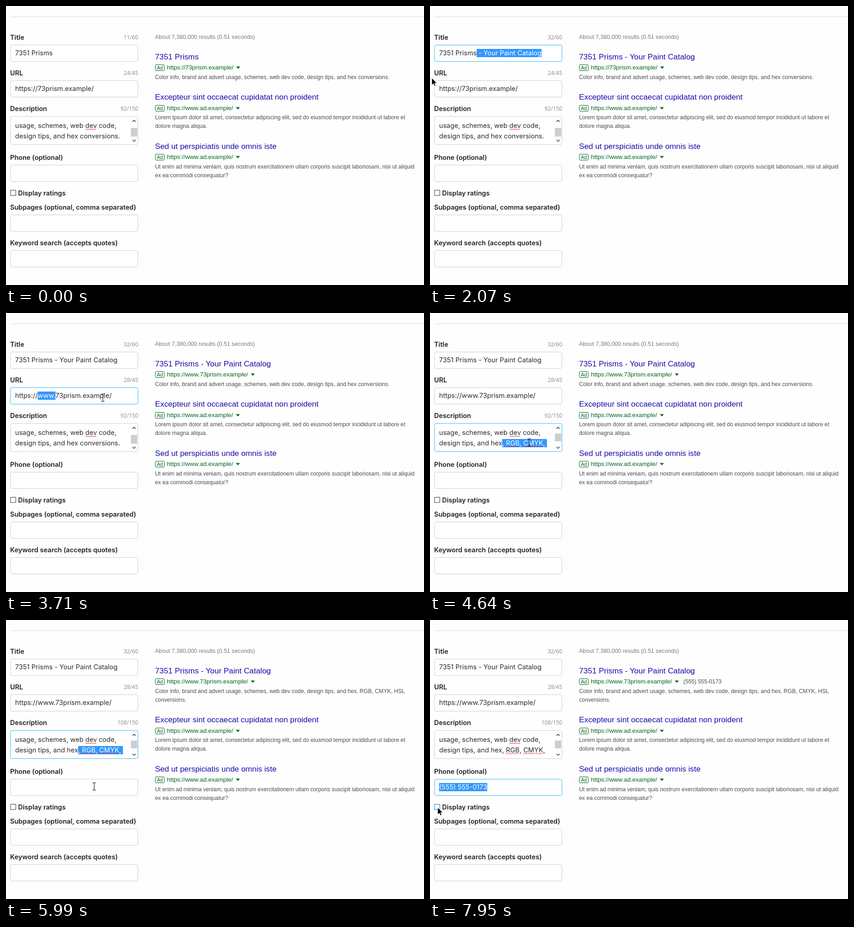
Recreate the animation shown at these times as an HTML page. Size 917 px wide and 611 px high, loop 8000 ms.

```html
<!DOCTYPE html>
<html lang="en">
<head>
<meta charset="utf-8">
<title>Ad preview</title>
<style>
html, body { margin: 0; width: 100%; height: 100%; overflow: hidden; background: #fefefe; }
svg { display: block; width: 917px; height: 611px; }
text { white-space: pre; }
.label { font: 600 14.55px Inter, sans-serif; fill: #222; }
.field { font: 400 14.6px Inter, sans-serif; fill: #2b2b2b; }
.count { font: 400 12px "Open Sans", sans-serif; fill: #888; text-anchor: end; }
.stats { font: 12.55px "Liberation Sans", Arial, sans-serif; fill: #7a7a7a; }
.link { font: 17.25px "Liberation Sans", Arial, sans-serif; fill: #1a0dab; }
.url { font: 13.4px "Liberation Sans", Arial, sans-serif; fill: #006621; }
.badge { font: 11px "Liberation Sans", Arial, sans-serif; fill: #006621; }
.body { font: 12.24px "Liberation Sans", Arial, sans-serif; fill: #4c4c4c; }
</style>
</head>
<body>
<svg id="stage" viewBox="0 0 917 611"></svg>
<script>
const LOOP = 8000;
const stage = document.getElementById('stage');
const ruler = document.createElement('canvas').getContext('2d');
const FIELD_FONT = '400 14.6px Inter, sans-serif';
const URL_FONT = '13.4px "Liberation Sans", Arial, sans-serif';

const NAME = '7351 Prisms', TAGLINE = ' - Your Paint Catalog';
const HOST = '73prism.example/', PHONE = '(555) 555-0173';
const OTHER_URL = 'https://www.ad.example/';

const width = (s, font = FIELD_FONT) => { ruler.font = font; return ruler.measureText(s).width; };
const text = (cls, x, y, s) => `<text class="${cls}" x="${x}" y="${y}">${s}</text>`;
const path = (d, attrs) => `<path d="${d}" ${attrs}/>`;
const rect = (x, y, w, h, attrs) => `<rect x="${x}" y="${y}" width="${w}" height="${h}" ${attrs}/>`;

const box = (y, h, focused) =>
  rect(10, y + .5, 279.5, h, `rx="3.5" fill="#fff" stroke="${focused ? '#2fb9ee' : '#ccc'}"`);

// Field text with an optional selected part or a caret after `before`
function fieldText(y, before, selected, after, caret) {
  const x = 20 + width(before);
  let out = text('field', 20, y, before);
  if (selected) {
    const w = width(selected);
    out += rect(x, y - 14, w, 18, 'fill="#3297fd"') +
      `<text class="field" x="${x}" y="${y}" style="fill:#fff">${selected}</text>` +
      text('field', x + w, y, after);
  } else {
    out += text('field', x, y, after);
  }
  if (caret) out += rect(Math.round(x), y - 14, 1, 18, 'fill="#222"');
  return out;
}

function squiggle(prefix, word, y) {
  const x = 20 + width(prefix);
  let d = `M${x} ${y}`;
  for (let i = 2, up = true; i <= width(word); i += 2, up = !up) d += `L${x + i} ${y + (up ? -2 : 0)}`;
  return path(d, 'fill="none" stroke="#e22" stroke-width="1"');
}

// A half-pixel `y` rounds up for the address row only
function ad(y, title, url, lines, phone) {
  const top = Math.floor(y), row = Math.round(y) + 22;
  const end = 353 + width(url, URL_FONT) + 6;
  return text('link', 327, top, title) +
    rect(327.5, row - 10.5, 20, 13, 'rx="2.5" fill="none" stroke="#006621"') +
    text('badge', 331, row, 'Ad') +
    text('url', 353, row, url) +
    path(`M${end} ${row - 6.5}h9l-4.5 5z`, 'fill="#006621"') +
    (phone ? text('body', end + 19, row, phone) : '') +
    lines.map((s, i) => text('body', 327, top + 43 + i * 19, s)).join('');
}

// Each run: points of time, x, y; the pointer is visible until `until`
const runs = [
  { until: 870, points: [[210, 7, 131], [480, 120, 104], [600, 120, 104], [870, 5, 131]] },
  { until: LOOP, points: [[2070, 4, 158], [2570, 212, 185], [3710, 212, 185], [3970, 217, 283],
    [5570, 217, 283], [5980, 193, 364], [7050, 193, 364], [7370, 38, 410], [7830, 20, 411], [7950, 17, 411]] }
];

function pointerAt(t) {
  const run = runs.find(r => t >= r.points[0][0] && t < r.until);
  if (!run) return null;
  const p = run.points;
  const i = p.findIndex(q => q[0] > t);
  if (i < 0) return p[p.length - 1].slice(1);
  const [t0, x0, y0] = p[i - 1], [t1, x1, y1] = p[i];
  const u = (t - t0) / (t1 - t0), e = u * u * (3 - 2 * u);
  return [x0 + (x1 - x0) * e, y0 + (y1 - y0) * e];
}

const inField = ([x, y]) => x > 10 && x < 272 &&
  [[85, 121], [163, 199], [242, 303], [348, 384]].some(([a, b]) => y > a && y < b);
const onCheckbox = ([x, y]) => x > 8 && x < 131 && y > 399 && y < 421;

function pointer(p) {
  const [x, y] = p.map(Math.round);
  return `<g transform="translate(${x} ${y})">` + (inField(p)
    ? path('M-3 -7.5h2.5l1 1 1-1h2.5M.5 -6.5v14M-3 8.5h2.5l1-1 1 1h2.5', 'fill="none" stroke="#111" stroke-width="1.1"')
    : path('M0 0V15L3.5 11.8 5.9 17.1 8.4 16 6 10.8H10.8Z', 'fill="#000" stroke="#fff" stroke-width=".6"')) + '</g>';
}

function draw(t) {
  const on = (a, b = LOOP) => t >= a && t < b;
  const focus = { title: on(510, 2520), url: on(2520, 4120), desc: on(4120, 6040), phone: on(6040) };
  const fullTitle = on(1330), www = on(3190), longDesc = on(4640), shown = on(4790), phone = on(6380);
  const p = pointerAt(t);
  const label = (y, s, x = 9) => text('label', x, y, s);
  const count = (y, s) => text('count', 290, y, s);

  let out = rect(9, 23, 908, 1, 'fill="#ddd"');

  out += label(74, 'Title') + count(73, on(1540) ? '32/60' : '11/60') + box(85, 36, focus.title) +
    fieldText(108, NAME, fullTitle && focus.title ? TAGLINE : '', fullTitle && !focus.title ? TAGLINE : '', on(510, 1040));

  out += label(152, 'URL') + count(151, www ? '28/45' : '24/45') + box(163, 36, focus.url) +
    fieldText(186, 'https://', www && focus.url ? 'www.' : '', (www && !focus.url ? 'www.' : '') + HOST, on(2540, 3070));

  const line = 'design tips, and hex', extra = ', RGB, CMYK, ';
  out += label(230, 'Description') + count(229, shown ? '108/150' : '92/150') + box(241.5, 61.5, focus.desc) +
    text('field', 20, 267, 'usage, schemes, web dev code,') + squiggle('usage, schemes, web ', 'dev', 271) +
    fieldText(290, line, longDesc && focus.desc ? extra : '',
      !longDesc ? ' conversions.' : focus.desc ? '' : extra, on(4120, 4640));
  if (longDesc) out += squiggle(line + ', ', 'RGB', 293.5) + squiggle(line + ', RGB, ', 'CMYK', 293.5);
  out += rect(274, longDesc ? 264 : 267, 14, longDesc ? 17 : 19, 'fill="#cdcdcd"') +
    path('M277.5 253.5l3.5-3.5 3.5 3.5M277.5 293l3.5 3.5 3.5-3.5', 'fill="none" stroke="#444" stroke-width="1.5"');

  out += label(337, 'Phone (optional)') + box(348, 36, focus.phone) +
    fieldText(371, '', phone ? PHONE : '', '', on(6040, 6380));

  out += rect(10, 403.5, 11.5, 11.5, `fill="#fff" stroke="${p && onCheckbox(p) ? '#0078d7' : '#333'}"`) +
    label(415, 'Display ratings', 26.5) +
    label(446, 'Subpages (optional, comma separated)') + box(457, 36) +
    label(524, 'Keyword search (accepts quotes)') + box(535, 36);

  const start = 'Color info, brand and advert usage, schemes, web dev code, design tips, and hex';
  const shift = shown ? 19 : 0;
  out += text('stats', 327, 72, 'About 7,380,000 results (0.51 seconds)') +
    ad(117, NAME + (on(1540) ? TAGLINE : ''), 'https://' + (www ? 'www.' : '') + HOST,
      shown ? [start + ', RGB, CMYK, HSL', 'conversions.'] : [start + ' conversions.'], on(6530) ? PHONE : '') +
    ad(205.5 + shift, 'Excepteur sint occaecat cupidatat non proident', OTHER_URL, [
      'Lorem ipsum dolor sit amet, consectetur adipiscing elit, sed do eiusmod tempor incididunt ut labore et',
      'dolore magna aliqua.']) +
    ad(313 + shift, 'Sed ut perspiciatis unde omnis iste', OTHER_URL, [
      'Ut enim ad minima veniam, quis nostrum exercitationem ullam corporis suscipit laboriosam, nisi ut aliquid',
      'ex ea commodi consequatur?']);

  return out + (p ? pointer(p) : '');
}

let last = '';
const begin = performance.now();
function tick() {
  const picture = draw((performance.now() - begin) % LOOP);
  if (picture !== last) stage.innerHTML = last = picture;
  requestAnimationFrame(tick);
}
tick();
</script>
</body>
</html>
```
